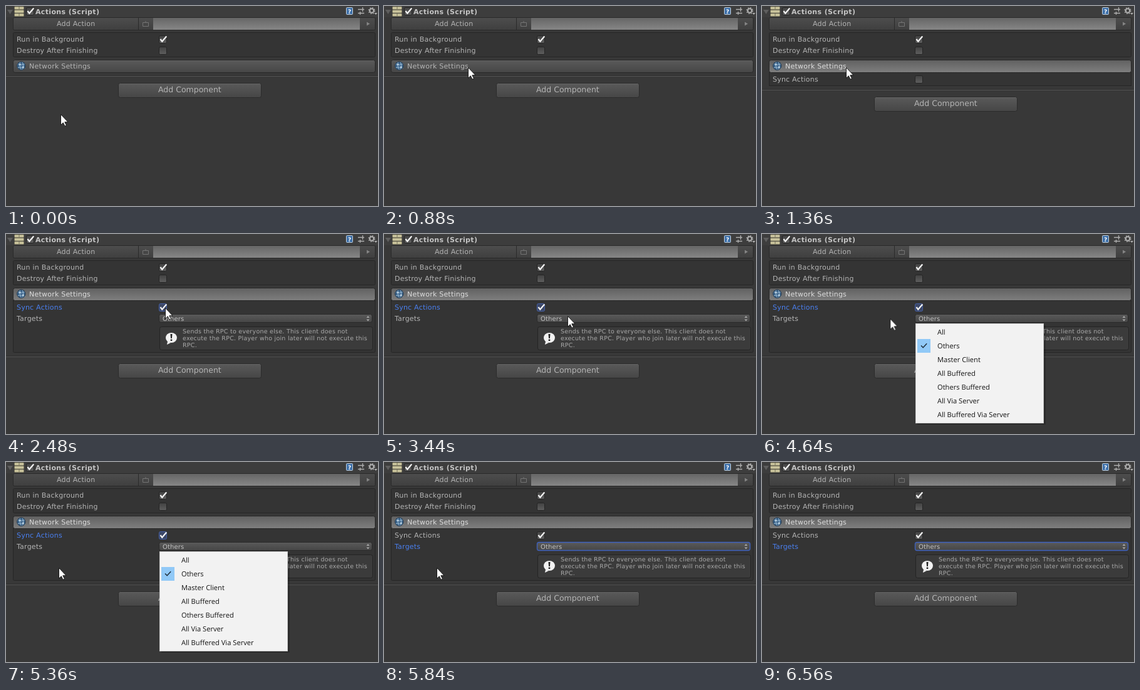
An HTML page for the animation above (7520 ms loop, 594 px wide and 320 px high).

```html
<!DOCTYPE html>
<html lang="en">
<head>
<meta charset="utf-8">
<title>Network settings inspector</title>
<style>
html, body { margin: 0; width: 100%; height: 100%; overflow: hidden; background: #383838; }
svg { display: block; width: 594px; height: 320px; }
text { font: 11px "DejaVu Sans", sans-serif; letter-spacing: .22px; fill: #b4b4b4; text-rendering: geometricPrecision; white-space: pre; }
.title { font-weight: bold; letter-spacing: .35px; fill: #c4c4c4; }
.big { font-size: 12.5px; letter-spacing: 0; }
.small { font-size: 10px; letter-spacing: .1px; fill: #c4c4c4; }
.help { font-size: 9.5px; letter-spacing: .25px; fill: #a9a9a9; }
.menu text { font: 11.15px "Open Sans", sans-serif; letter-spacing: 0; fill: #151515; }
.blue { fill: #4a7fee; }
.bright { fill: #dcdcdc; }

/* every state change is a hard cut on one shared clock */
.lit, .open, .synced, .sync-focus, .target-focus, .sync-idle, .target-idle, .foot, .menu {
  animation: 7520ms step-end infinite;
}
.lit { animation-name: lit; }
.open { animation-name: open; }
.synced { animation-name: synced; }
.sync-focus { animation-name: sync-focus; }
.sync-idle { animation-name: sync-idle; }
.target-focus { animation-name: target-focus; }
.target-idle { animation-name: target-idle; }
.foot { animation-name: foot; }
.menu { animation-name: menu; }
.cursor { animation: move 7520ms linear infinite; }

@keyframes lit { 0% { visibility: hidden } 13.82%, 100% { visibility: visible } }
@keyframes open { 0% { visibility: hidden } 14.88%, 100% { visibility: visible } }
@keyframes synced { 0% { visibility: hidden } 25.52%, 100% { visibility: visible } }
@keyframes sync-focus { 0% { visibility: hidden } 25.52% { visibility: visible } 77.65%, 100% { visibility: hidden } }
@keyframes sync-idle { 0% { visibility: hidden } 14.88% { visibility: visible } 25.52% { visibility: hidden } 77.65%, 100% { visibility: visible } }
@keyframes target-focus { 0% { visibility: hidden } 77.65%, 100% { visibility: visible } }
@keyframes target-idle { 0% { visibility: hidden } 25.52% { visibility: visible } 77.65%, 100% { visibility: hidden } }
@keyframes foot {
  0% { transform: translateY(0) }
  14.88% { transform: translateY(22px) }
  25.52%, 100% { transform: translateY(84px) }
}
@keyframes menu { 0% { opacity: 0 } 56.37% { opacity: .6 } 57.43% { opacity: 1 } 77.65%, 100% { opacity: 0 } }
@keyframes move {
  0%, 2.7% { transform: translate(87px, 173px); animation-timing-function: ease-in-out }
  11.7%, 18.3% { transform: translate(134px, 98px); animation-timing-function: ease-in-out }
  23.4%, 34.4% { transform: translate(254px, 118px); animation-timing-function: ease-in-out }
  43.62% { transform: translate(293px, 130px); animation-timing-function: step-end }
  45.74%, 56.5% { transform: translate(293px, 131px); animation-timing-function: ease-in }
  61.7% { transform: translate(205px, 135px); animation-timing-function: ease-out }
  65.96% { transform: translate(84px, 169px); animation-timing-function: step-end }
  70.21% { transform: translate(83px, 169px); animation-timing-function: step-end }
  71.28%, 77.9% { transform: translate(84px, 169px); animation-timing-function: ease-in-out }
  81.91%, 83.2% { transform: translate(104px, 60px); animation-timing-function: ease-in }
  87.2%, 100% { transform: translate(112px, -24px) }
}
</style>
</head>
<body>
<svg viewBox="0 0 594 320" xmlns="http://www.w3.org/2000/svg">
  <defs>
    <linearGradient id="btn" x2="0" y2="1"><stop stop-color="#686868"/><stop offset=".1" stop-color="#585858"/><stop offset="1" stop-color="#464646"/></linearGradient>
    <linearGradient id="tool" x2="0" y2="1"><stop stop-color="#4d4d4d"/><stop offset="1" stop-color="#3f3f3f"/></linearGradient>
    <linearGradient id="field" x2="0" y2="1"><stop stop-color="#666"/><stop offset="1" stop-color="#868686"/></linearGradient>
    <linearGradient id="on" x2="0" y2="1"><stop stop-color="#606060"/><stop offset="1" stop-color="#7f7f7f"/></linearGradient>
    <linearGradient id="well" x2="0" y2="1"><stop stop-color="#424242"/><stop offset="1" stop-color="#5e5e5e"/></linearGradient>
    <g id="box"><rect x=".5" y=".5" width="12" height="12" rx="2" fill="url(#well)" stroke="#242424"/></g>
    <path id="tick" d="M2.500 6 5.300 9.800 12.300 1.500" fill="none" stroke="#f4f4f4" stroke-width="2.200"/>
    <g id="globe">
      <circle r="7" fill="#3f668c"/>
      <g fill="none" stroke="#9fc0d8" stroke-width=".9">
        <path d="M-6 -3Q0 0 6 -3M-6 3Q0 1 6 4M-2 -6.5Q-4 0 0 6.5M2 -6.5Q5 0 2 6.5"/>
        <circle r="6.6" stroke="#1f2f40"/>
      </g>
      <circle cx="-2" cy="-2" r="1.2" fill="#d2e4ee"/><circle cx="3" cy="2" r="1.2" fill="#d2e4ee"/>
    </g>
  </defs>

  <rect width="594" height="320" fill="#383838"/>

  <!-- header -->
  <rect width="594" height="18" fill="#3d3d3d"/>
  <path d="M2 6h9l-4.500 7z" fill="#5e5e5e"/>
  <g fill="#c9c39c" stroke="#77735a" stroke-width=".6">
    <rect x="13.500" y="1" width="15" height="4.500" rx="1"/><rect x="13.500" y="6.500" width="15" height="4.500" rx="1"/><rect x="13.500" y="12" width="15" height="4.500" rx="1"/>
  </g>
  <path d="M21 1v4M21 12v4" stroke="#77735a"/>
  <use href="#box" x="32" y="2"/><use href="#tick" x="32" y="2"/>
  <text class="title" x="47" y="13">Actions (Script)</text>
  <rect x="543.500" y="2.500" width="10" height="11" rx="1" fill="#3d6fa8" stroke="#c5d3e0"/>
  <text x="546" y="12" style="font-size:9px;font-weight:bold;fill:#fff">?</text>
  <path d="M562 5.500h10M562 11.500h10M569.500 2v7M565.500 9v5" stroke="#b0b0b0" stroke-width="1.300"/>
  <circle cx="584" cy="7.500" r="3.200" fill="none" stroke="#b0b0b0" stroke-width="2"/>
  <circle cx="584" cy="7.500" r="4.800" fill="none" stroke="#b0b0b0" stroke-width="1.500" stroke-dasharray="1.900 1.870"/>
  <path d="M588 11h5l-2.500 3z" fill="#b0b0b0"/>

  <!-- toolbar -->
  <rect x="11.500" y="18.500" width="578" height="20" rx="2" fill="url(#tool)" stroke="#2a2a2a"/>
  <rect x="235" y="19" width="330" height="19" fill="url(#field)"/>
  <path d="M211.500 19v19" stroke="#2a2a2a"/>
  <text x="81" y="32">Add Action</text>
  <path d="M218.500 26.500h9v6h-9zM223 27v-3" fill="none" stroke="#747474"/>
  <path d="M576 25.500v6l5-3z" fill="#858585"/>

  <!-- options -->
  <rect x="11.500" y="42.500" width="578" height="39" rx="2" fill="#343434" stroke="#262626"/>
  <text x="17" y="57">Run in Background</text>
  <text x="17" y="75">Destroy After Finishing</text>
  <use href="#box" x="244" y="47"/><use href="#tick" x="244" y="47"/>
  <use href="#box" x="244" y="65"/>

  <!-- network section -->
  <rect class="open" x="11.500" y="106.500" width="578" height="21" fill="#343434" stroke="#262626"/>
  <rect class="synced" x="11.500" y="106.500" width="578" height="83" rx="2" fill="#343434" stroke="#262626"/>
  <rect x="11.500" y="86.500" width="578" height="20" rx="3" fill="url(#btn)" stroke="#282828"/>
  <text x="37" y="100">Network Settings</text>
  <g class="lit">
    <rect x="11.500" y="86.500" width="578" height="20" rx="3" fill="url(#on)" stroke="#282828"/>
    <text class="bright" x="37" y="100">Network Settings</text>
  </g>
  <use href="#globe" x="24.300" y="95.700"/>

  <g class="sync-idle">
    <text x="17" y="121">Sync Actions</text>
    <use href="#box" x="244" y="111"/>
  </g>
  <g class="sync-focus">
    <text class="blue" x="17" y="121">Sync Actions</text>
    <rect x="244.500" y="111.500" width="12" height="12" rx="2" fill="#3c4766" stroke="#4560a8"/>
  </g>
  <g class="synced">
    <use href="#tick" x="244" y="111"/>
    <rect x="244.500" y="128.500" width="340" height="13" rx="3" fill="url(#btn)" stroke="#292929"/>
    <path d="M575.500 134h5l-2.500-3zM575.500 136.500h5l-2.500 3z" fill="#a8a8a8"/>
    <text class="small" x="250" y="138.600">Others</text>
    <rect x="245.500" y="148.500" width="340" height="37" rx="3" fill="#3b3b3b" stroke="#242424"/>
    <path d="M258 172l-1 5 6-3z" fill="#f2f2f2"/>
    <ellipse cx="264" cy="166" rx="9" ry="8" fill="#f2f2f2"/>
    <path d="M262.500 160h3l-.6 7h-1.800zM262.700 168.500h2.600v2.500h-2.600z" fill="#222"/>
    <text class="help" x="282" y="159">Sends the RPC to everyone else. This client does not</text>
    <text class="help" x="282" y="170">execute the RPC. Player who join later will not execute this</text>
    <text class="help" x="282" y="181">RPC.</text>
  </g>
  <text class="target-idle" x="17" y="139">Targets</text>
  <g class="target-focus">
    <text class="blue" x="17" y="139">Targets</text>
    <rect x="244.500" y="128.500" width="340" height="13" rx="3" fill="none" stroke="#3f62c0" stroke-width="1.300"/>
  </g>

  <!-- footer -->
  <g class="foot">
    <path d="M0 111.500h594" stroke="#2d2d2d"/>
    <path d="M0 112.500h594" stroke="#555"/>
    <rect x="179.500" y="123.500" width="228" height="23" rx="3" fill="url(#btn)" stroke="#2b2b2b"/>
    <text class="big" x="243" y="138">Add Component</text>
  </g>

  <!-- drop-down -->
  <g class="menu" opacity="0">
    <rect x="248" y="146" width="205" height="159" fill="#000" opacity=".2"/>
    <rect x="245.500" y="143.500" width="204" height="159" fill="#f2f2f2" stroke="#ccc"/>
    <rect x="248" y="168" width="21" height="22" fill="#91c9f7"/>
    <path d="M254 178.500l3.200 3.200 6-6.400" fill="none" stroke="#1a2733" stroke-width="1.400"/>
    <text x="280" y="161">All</text>
    <text x="280" y="183">Others</text>
    <text x="280" y="205">Master Client</text>
    <text x="280" y="227">All Buffered</text>
    <text x="280" y="249">Others Buffered</text>
    <text x="280" y="271">All Via Server</text>
    <text x="280" y="293">All Buffered Via Server</text>
  </g>

  <path class="cursor" d="M.5 .5v16.800l3.800-3.600 2.700 5.500 2.500-1.100-2.700-5.400h5.200z" fill="#fff" stroke="#111" stroke-width=".9"/>
</svg>
</body>
</html>
```
